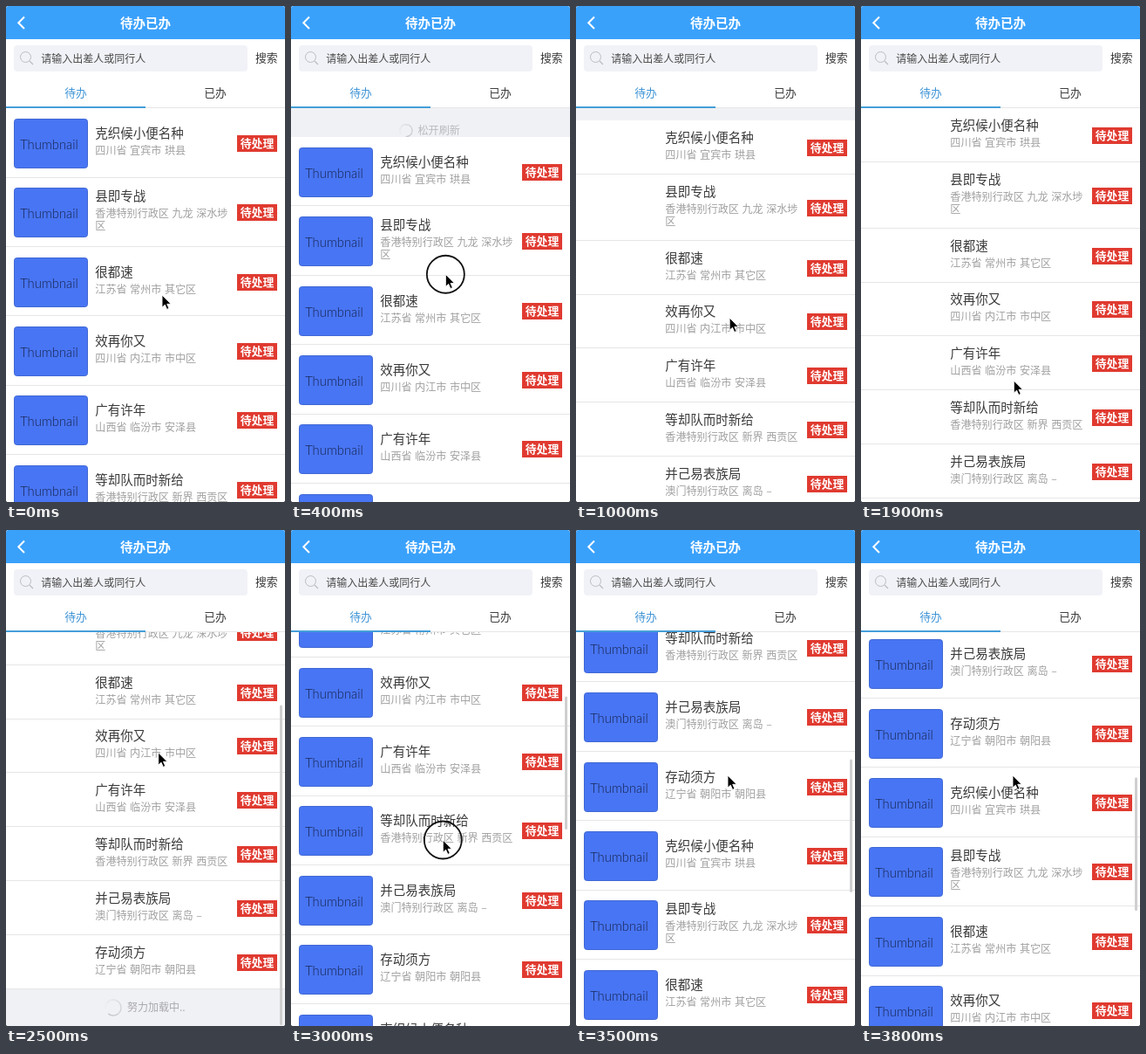
Recreate the animation shown at these times as an HTML page. Size 320 px wide and 568 px high, loop 3.9 s.

```html
<!DOCTYPE html>
<html lang="zh-CN">
<head>
<meta charset="utf-8">
<title>待办已办</title>
<style>
html, body { margin: 0; width: 100%; height: 100%; overflow: hidden; background: #3a3f48; }
svg { display: block; width: 320px; height: 568px; border-radius: 3px; background: #fff; }
text { font-family: "Noto Sans CJK SC", "Noto Sans CJK", "Noto Sans", sans-serif; word-spacing: .8px; }
.thumb { font-family: Lato, "Open Sans", sans-serif; font-weight: 300; text-anchor: middle; }
.mid { text-anchor: middle; }
.bold { text-anchor: middle; font-weight: 700; }
</style>
</head>
<body>
<svg viewBox="0 0 320 568">
  <defs><clipPath id="view"><rect y="117" width="320" height="451"/></clipPath></defs>
  <g clip-path="url(#view)">
    <rect y="117" width="320" height="451" fill="#f0f1f5"/>
    <g id="pull"></g>
    <g id="list"></g>
    <rect id="bar" x="314" width="3" rx="1.5" fill="#cfcfcf"/>
  </g>
  <g id="top"></g>
  <circle id="touch" r="21.5" fill="none" stroke="#111" stroke-width="1.8"/>
  <path id="arrow" d="M0 0V14.2L3.3 11.2L5.6 16.4L8 15.3L5.7 10.3H10.2Z" fill="#000" stroke="#fff" stroke-width=".9"/>
</svg>
<script>
const NS = 'http://www.w3.org/2000/svg';
const TOP = 117.6, VIEW = 568 - TOP, FOOT = 42, LOOP = 3900, STEP = 100;
const INK = '#3a3a3a', BLUE = '#3d93d6', LINE = '#e6e6e6', PALE = '#bcbdc2';
const $ = id => document.getElementById(id);

function add(parent, tag, attrs, content) {
  const el = document.createElementNS(NS, tag);
  for (const k in attrs) el.setAttribute(k, attrs[k]);
  if (content) el.textContent = content;
  parent.appendChild(el);
  return el;
}

const box = (parent, x, y, width, height, fill, more) =>
  add(parent, 'rect', { x, y, width, height, fill, ...more });
const line = (parent, d, stroke, width) =>
  add(parent, 'path', { d, fill: 'none', stroke, 'stroke-width': width });
// y is the visual middle of the glyphs
const label = (parent, str, x, y, size, fill, cls = '') =>
  add(parent, 'text', { x, y: y + size * .37, 'font-size': size, fill, class: cls }, str);
const move = (el, x, y) => el.setAttribute('transform', `translate(${x} ${y})`);
const show = (el, on) => el.setAttribute('visibility', on ? 'inherit' : 'hidden');

// A ring of arcs that fades out towards its tail
function spinner(parent, x, y, r) {
  const g = add(parent, 'g', {});
  const at = a => `${r * Math.cos(a)} ${r * Math.sin(a)}`;
  const parts = 8, arc = 5.4 / parts;
  for (let i = 0; i < parts; i++) {
    line(g, `M${at(i * arc)}A${r} ${r} 0 0 1 ${at((i + 1) * arc)}`, '#c9cacd', 1.6)
      .setAttribute('opacity', (i + 1) / parts);
  }
  return deg => g.setAttribute('transform', `translate(${x} ${y}) rotate(${deg})`);
}

const items = [
  ['克织候小便名种', '四川省 宜宾市 珙县'],
  ['县即专战', '香港特别行政区 九龙 深水埗', '区'],
  ['很都速', '江苏省 常州市 其它区'],
  ['效再你又', '四川省 内江市 市中区'],
  ['广有许年', '山西省 临汾市 安泽县'],
  ['等却队而时新给', '香港特别行政区 新界 西贡区'],
  ['并己易表族局', '澳门特别行政区 离岛 –'],
  ['存动须方', '辽宁省 朝阳市 朝阳县']
];

function makeRow([title, ...lines]) {
  const el = add($('list'), 'g', {});
  const back = box(el, 0, 0, 320, 80, '#fff');
  const edge = box(el, 0, 0, 320, 1, LINE);
  const body = add(el, 'g', {});
  const thumb = add(body, 'g', {});
  box(thumb, 9.5, -27.5, 84, 56, '#4875f3', { rx: 3, stroke: '#4068d4' });
  label(thumb, 'Thumbnail', 49.5, 1.5, 14.8, '#17244f', 'thumb');
  const shift = lines.length > 1 ? -7 : 0;
  label(body, title, 102.3, -11.3 + shift, 14.5, INK);
  lines.forEach((s, i) => label(body, s, 102.3, 8.8 + shift + i * 14, 12.1, '#a0a0a0'));
  box(body, 265, -9, 46, 19, '#e03a30');
  label(body, '待处理', 288, .4, 12.8, '#fff', 'bold');

  // Places the row and returns its height
  const place = (y, withThumb) => {
    const h = withThumb ? 79.4 : lines.length > 1 ? 75.8 : 61.8;
    const top = Math.floor(y);
    move(el, 0, top);
    back.setAttribute('height', h + 1);
    edge.setAttribute('y', Math.floor(y + h) - top - 1);
    move(body, 0, Math.floor(y + h / 2) - top);
    show(thumb, withThumb);
    return h;
  };
  return { el, place };
}

const rows = [...items, ...items].map(makeRow);

const foot = add($('list'), 'g', {});
box(foot, 0, 0, 320, FOOT, '#f0f1f5');
label(foot, '努力加载中..', 139, 21, 12, '#a9a9ac');
const spinFoot = spinner(foot, 123, 21, 9);

label($('pull'), '松开刷新', 145.5, 142.7, 12.1, '#b9babd');
const spinPull = spinner($('pull'), 132, 142.7, 7);

(function drawTop() {
  const g = $('top');
  box(g, 0, 0, 320, 117, '#fff');
  box(g, 0, 0, 320, 38, '#3aa1fb');
  line(g, 'M21 12.5L14.3 19.2L21 26', '#fff', 2);
  label(g, '待办已办', 160, 19.2, 14.5, '#fff', 'bold');
  box(g, 9, 45, 268, 30, '#f1f2f7', { rx: 4 });
  add(g, 'circle', { cx: 22.5, cy: 58.5, r: 6, fill: 'none', stroke: PALE });
  line(g, 'M27 63L31 67', PALE, 1.2);
  label(g, '请输入出差人或同行人', 40.3, 60.5, 12, '#4a4a4a');
  label(g, '搜索', 286, 59.3, 12.8, INK);
  label(g, '待办', 80, 99, 12.8, BLUE, 'mid');
  label(g, '已办', 240, 99, 12.8, INK, 'mid');
  box(g, 0, 116, 320, 1, LINE);
  box(g, 0, 115, 160, 2, '#459fd8');
})();

const flat = u => u;
const smooth = u => u * u * (3 - 2 * u);
const glide = u => 1 - (1 - u) ** 1.52;
const ramp = (t, a, b, ease = smooth) => ease(Math.min(1, Math.max(0, (t - a) / (b - a))));
const within = (t, a, b) => t >= a && t <= b;

// Pull down, spring back, drag to the end, then fling
const scrollAt = t =>
  65.8 * (ramp(t, 200, 600) - ramp(t, 600, 1170))
  - 100 * ramp(t, 1900, 2400)
  - 380 * ramp(t, 2800, 3800, glide);

const pointerAt = t => [
  179 - 2.5 * ramp(t, 0, 600, flat) - 2.5 * ramp(t, 600, 3300, flat),
  331 - 69 * ramp(t, 0, 200) + 90.5 * ramp(t, 200, 600) + 76.5 * ramp(t, 860, 1800)
    - 174 * (ramp(t, 1900, 2500) - ramp(t, 2500, 2800)) - 148 * ramp(t, 2800, 3200)
];

function draw(t) {
  const more = t >= 2800;
  const thumbs = t < 900 || more;
  const offset = scrollAt(t);
  const count = more ? rows.length : items.length;

  let y = TOP + offset;
  rows.forEach(({ el, place }, i) => {
    show(el, i < count);
    if (i < count) y += place(y, thumbs);
  });
  move(foot, 0, Math.floor(y));
  spinFoot(t * .36);
  spinPull(t * .36);
  show($('pull'), offset > 0);

  const k = VIEW / (y + FOOT - TOP - offset);
  $('bar').setAttribute('y', TOP + 1 - offset * k);
  $('bar').setAttribute('height', VIEW * k - 2);
  show($('bar'), within(t, 2000, 2600) || t >= 2900);

  const [px, py] = pointerAt(t);
  move($('arrow'), px, py);
  move($('touch'), px, py);
  show($('touch'), within(t, 200, 600) || within(t, 2000, 2400) || within(t, 2800, 3100));
}

const start = performance.now();
function tick() {
  const t = (performance.now() - start) % LOOP;
  draw(Math.floor(t / STEP) * STEP);
  requestAnimationFrame(tick);
}
tick();
</script>
</body>
</html>
```
